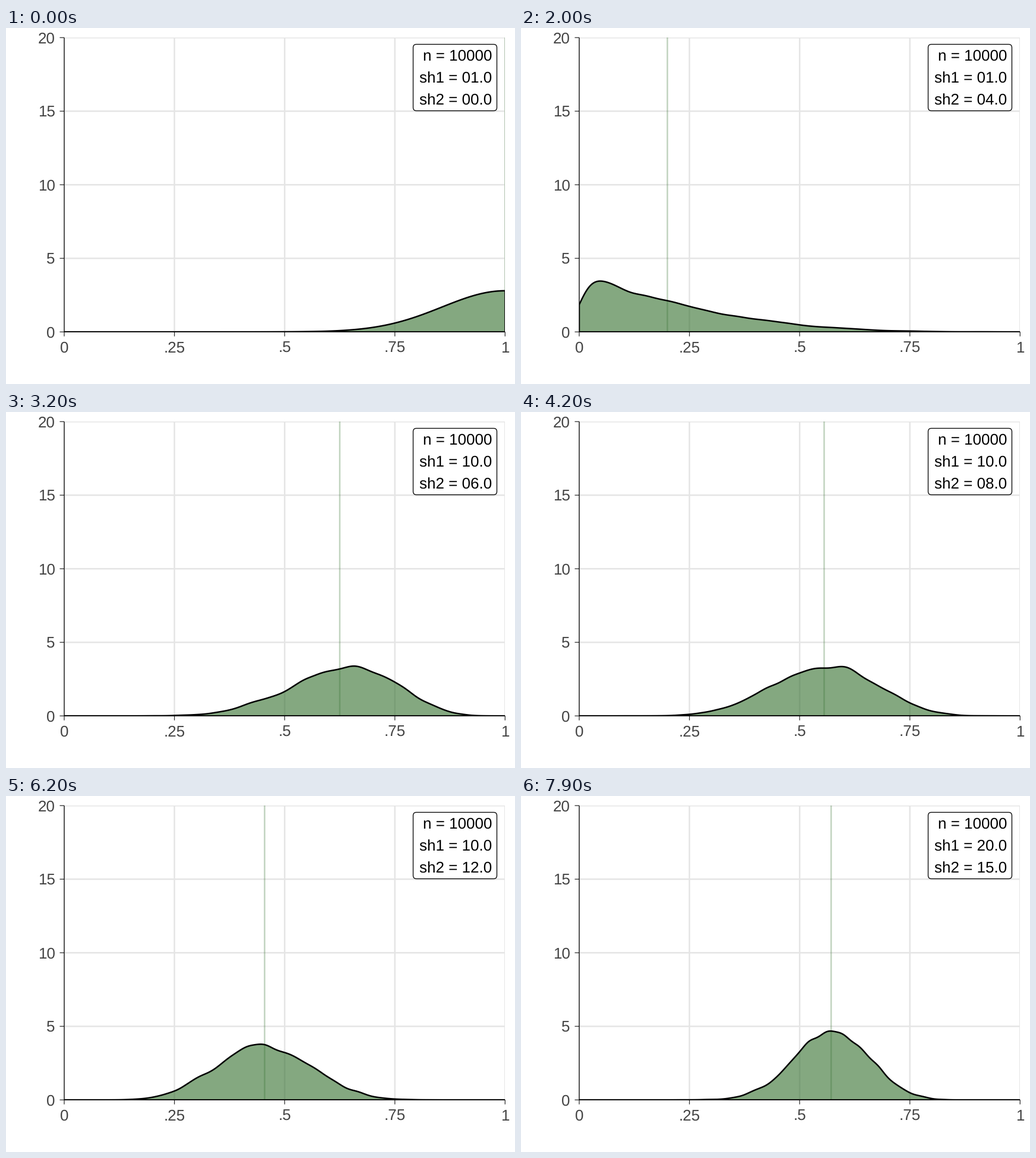
A matplotlib script for the animation above (8000 ms loop, 857x600 px).

```python
import numpy as np
import matplotlib.pyplot as plt
from matplotlib.animation import FuncAnimation
from matplotlib.patches import FancyBboxPatch, Polygon

W, H, DPI = 857, 600, 64
PT = 72 / DPI  # points per pixel
LEFT, RIGHT, TOP, BOTTOM = 98, 840.3, 16.2, 512.2
FRAMES, STEP = 80, 100

SAMPLES = 10000
SHAPES = (1, 5, 10, 15, 20)
GREEN = (50 / 255, 110 / 255, 44 / 255)

plt.rcParams["font.family"] = "Liberation Sans"
plt.rcParams["text.hinting"] = "none"

grid = np.linspace(0, 1, 512)
bins = (np.arange(1000) + .5) / 1000


def kernel(d, bw):
    return np.exp(-.5 * (d / bw) ** 2) / (bw * np.sqrt(2 * np.pi))


def bandwidth(p):
    """Silverman's rule for weights p on the bins."""
    sd = np.sqrt(p @ (bins - p @ bins) ** 2)
    q1, q3 = np.interp([.25, .75], np.cumsum(p), bins)
    return .9 * min(sd, (q3 - q1) / 1.34) * SAMPLES ** -.2


def density(a, b):
    """Kernel density of a seeded Beta(a, b) sample on the grid."""
    if b == 0:  # every draw equals 1
        return kernel(grid - 1, .9 * SAMPLES ** -.2)
    p = bins ** (a - 1) * (1 - bins) ** (b - 1)
    rng = np.random.default_rng(100 * b + a)
    p = rng.multinomial(SAMPLES, p / p.sum()) / SAMPLES
    return kernel(grid[:, None] - bins, bandwidth(p)) @ p


fig = plt.figure(figsize=(W / DPI, H / DPI), dpi=DPI, facecolor="white")

panel = fig.add_axes([LEFT / W, 1 - BOTTOM / H,
                      (RIGHT - LEFT) / W, (BOTTOM - TOP) / H])
panel.set(xlim=(0, 1), ylim=(0, 20))
panel.axis("off")

page = fig.add_axes([0, 0, 1, 1])
page.set(xlim=(0, W), ylim=(H, 0))
page.axis("off")


def line(xs, ys, color="black"):
    page.plot(xs, ys, color=color, lw=1.3 * PT, solid_capstyle="butt",
              snap=False)


def text(x, y, s, ha, color="black"):
    return page.text(x, y, s, ha=ha, va="baseline", color=color,
                     fontsize=26 * PT)


# Grid, ticks and tick labels
rule = dict(color="#e5e5e5", lw=2.5 * PT, zorder=1, snap=False)
for i, name in enumerate(("0", ".25", ".5", ".75", "1")):
    panel.axvline(i / 4, **rule)
    panel.axhline(i * 5, **rule)
    x = LEFT + (RIGHT - LEFT) * i / 4
    y = BOTTOM + (TOP - BOTTOM) * i / 4
    line([x, x], [BOTTOM, BOTTOM + 7.5], "#333333")
    line([LEFT - 7.5, LEFT], [y, y], "#333333")
    text(x, 547, name, "center", "#444444")
    text(82.5, y + 9.2, str(i * 5), "right", "#444444")
line([LEFT, LEFT], [TOP, BOTTOM])
line([LEFT, RIGHT], [BOTTOM, BOTTOM])

mean_line = panel.axvline(1, color=GREEN, alpha=.3, lw=2.5 * PT, zorder=2,
                          snap=False)
area = panel.add_patch(Polygon([(0, 0), (1, 0), (1, 1)], closed=True,
                               facecolor=GREEN + (.6,), edgecolor="black",
                               lw=2.5 * PT, zorder=3))

# Label box
page.add_patch(FancyBboxPatch((685.5, 27.5), 141, 112,
                              boxstyle="round,pad=0,rounding_size=5.5",
                              facecolor="white", edgecolor="black",
                              lw=1.3 * PT, zorder=2.5))
text(818, 55, f"n = {SAMPLES}", "right")
label1 = text(818, 92.5, "", "right")
label2 = text(818, 130, "", "right")


def update(i):
    b, k = divmod(i, len(SHAPES))
    a = SHAPES[k]
    x = np.r_[0, grid, 1]
    y = np.r_[0, density(a, b), 0]
    area.set_xy(np.column_stack([x, y]))
    mean = a / (a + b)
    mean_line.set_xdata([mean, mean])
    label1.set_text(f"sh1 = {a:04.1f}")
    label2.set_text(f"sh2 = {b:04.1f}")
    return area, mean_line, label1, label2


anim = FuncAnimation(fig, update, frames=FRAMES, interval=STEP, repeat=True,
                     repeat_delay=0, blit=False)
plt.show()
```
